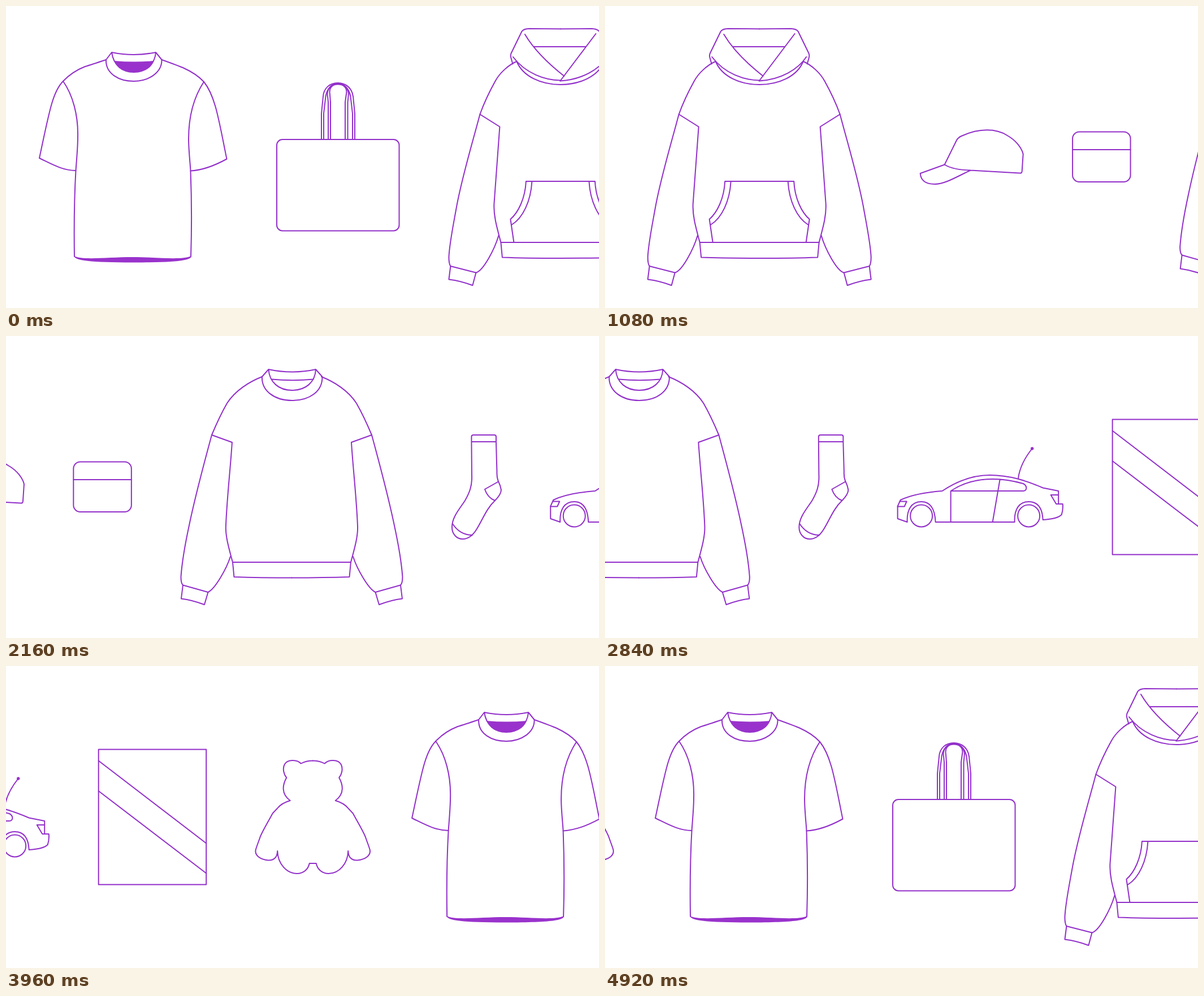
Animation of 1049x534 px, one loop 4960 ms. Source, as an HTML page:

```html
<!DOCTYPE html>
<html lang="en">
<head>
<meta charset="utf-8">
<title>Merchandise strip</title>
<style>
  html, body { margin: 0; width: 100%; height: 100%; overflow: hidden; background: #fff; }
  svg { display: block; width: 1049px; height: 534px; }
  #track { fill: none; stroke: #922fca; stroke-width: 2; stroke-linejoin: round; stroke-linecap: round; }
  .solid { fill: #9932cc; stroke: none; }
</style>
</head>
<body>
<svg viewBox="0 0 1049 534">
  <g id="track">
    <g id="shirt">
      <path d="M177 95C165 99 150 104 140 107Q117 116 101 133C82 152 76 190 59 269C80 279 100 291 123.5 291"/>
      <path d="M101 133C118 157 128 193 127 232C127 250 125 270 123.5 291C121 335 120 380 121 443"/>
      <path d="M275.5 95C295 102 306 106 315 110Q337 120 350 134C371 160 377 205 390.5 270.5Q355 290 326.5 291.5"/>
      <path d="M350 134C333 160 323 195 323 235C323 255 326 280 326.5 291.5C328 330 329 380 327 443"/>
      <path d="M187 82L177 95C176 120 200 133 226 133C252 133 276 118 275.5 95L265 82Q226 90 187 82C190 104 205 117 226 117C247 117 263 104 265 82"/>
      <path class="solid" d="M191.5 97Q226 100 262 97C256 111 244 117 226 117C208 117 197 111 191.5 97Z"/>
      <path class="solid" d="M120.5 442C135 450 180 444 224 444C268 444 310 450 328 442C328 449 310 453.500 224 453.500C150 453.500 121 450 120.500 442Z"/>
    </g>

    <g id="bag">
      <rect x="479" y="236" width="216.500" height="161.500" rx="10"/>
      <path d="M558 236V190L561 160C562 145 573 136 587 136C601 136 612 145 614 160L617 190V236"/>
      <path d="M562 236V190L565.500 160C568 146 576 137 587 137C598 137 607 146 609.500 160L613 190V236"/>
      <path d="M570 236V170L568.500 155C569 145 578 137 587 137C597 137 605 145 606 155L604.500 170V236"/>
      <path d="M574 236V170L572.500 152C573 143 579 138.500 587 138.500C596 138.500 602 143 602.500 152L600 170V236"/>
    </g>

    <g id="hoodie" transform="translate(419.4)">
      <g id="hoodieHalf">
        <path d="M561.5 40.5L506 40Q496 40.500 493 45L474 84Q472.500 88 474 92L477 102.500"/>
        <path d="M561.5 139C528 139 495 125 484 98C470 104 454 118 446 133C436 151 426 172 419 191.500L454 213.500C451 260 447 305 444 350C443 370 448 388 456 418"/>
        <path d="M419 191.5C404 248 388 300 378 353C371 392 365 420 364 444Q364 456 367 460L412 471.500C425 468 445 430 452 406"/>
        <path d="M367 460L364 483.500Q385 486 406 494L412 471.500"/>
        <path d="M561.5 418H456L458.500 444.500Q500 446 561.500 446"/>
        <path d="M561.5 310H500.500C499 340 487 365 473 377L479 418M511 310C509 345 495 375 475 387"/>
      </g>
      <use href="#hoodieHalf" transform="matrix(-1 0 0 1 1123 0)"/>
      <path d="M477.5 90C500 120 535 131 561 131.500M561 132.500C600 130 630 112 644.500 90"/>
      <path d="M498.5 50C515 78 540 102 568 124M624 49L561 132.500M514 72H606"/>
    </g>

    <g transform="translate(419.4)">
      <path d="M889 280.5L910 238Q913 232 920 229.500C950 216 980 216 1000 229C1016 238 1026 252 1028 262L1026 292Q1026 296 1022 295.500L935 290.500Q905 290 889 280.500L846 296C847 309 857 315 872 315C890 315 912 301 935 290.500"/>
    </g>

    <g transform="translate(1022.3)">
      <rect x="512.500" y="222.500" width="102.500" height="88.500" rx="12"/>
      <path d="M512.5 254H615"/>
    </g>

    <g transform="translate(1415.4)">
      <g id="sweaterHalf">
        <path d="M453 72C430 81 405 97 391 119C379 140 372 156 364 175L400 188C397 235 391 285 389 335C388 352 393 371 401 400"/>
        <path d="M364 175C349 230 335 282 324 335C316 372 311 405 309.500 426Q309.500 437 313 440.500L357.500 453C370 447 390 412 397 390"/>
        <path d="M313 440.5L310 464.500Q330 467 351 475L357.500 453"/>
        <path d="M505.5 400H401L403.500 426Q450 427.500 505.500 427.500"/>
      </g>
      <use href="#sweaterHalf" transform="matrix(-1 0 0 1 1011 0)"/>
      <path d="M464.5 59L453 72C452 97 475 114 506 114C537 114 560 98 559.500 72L548 59Q506 68 464.500 59C466 82 483 96 506 96C530 96 547 82 548 59M470 76.500Q506 80 544 76.500"/>
    </g>

    <g transform="translate(1415.4)">
      <path d="M823.5 187V178Q823.500 175 827 175H864Q867 175 867 178V187L868.500 240Q868 250 871 257Q875 265 876 272C876 277 873 283 865 291C850 305 843 325 833 341C827 351 819 359 808 359C797 359 789 350 789 338C789 320 803 305 812 291C820 277 825 265 824 245L823.500 187H867"/>
      <path d="M871 257.500L847 271Q852 286 865 291M790 332Q803 352 825 352"/>
    </g>

    <g transform="translate(2306.7)">
      <path d="M72 323V301L77 290C98 280 125 276 151 274C175 258 205 246 235 246C270 246 300 256 329 268.500L356.500 274V297H364Q365 307 362 316C357 321 345 324 329 325C328 305 320 293 304 293C287 293 278 306 279 329H139C138 307 131 293 114 293C97 293 88 306 89 329Z"/>
      <path d="M76 292.500H88L84 301.500H72M356.500 281H343L352.500 297H357"/>
      <path d="M166 329V274C187 260 212 253 240 253C262 253 280 257 294 261C301 264 302 274 294 274H166M253 253.500L240 329"/>
      <circle cx="114" cy="318" r="19.500"/>
      <circle cx="304" cy="318" r="19.500"/>
      <path d="M285.5 251C288 232 298 214 310 199"/>
      <circle class="solid" cx="310" cy="199" r="2.700"/>
    </g>

    <g transform="translate(2306.7)">
      <rect x="452" y="147.500" width="190.500" height="239"/>
      <path d="M452 167.500L642.500 313.500M452 221L642.500 366.500"/>
    </g>

    <g transform="translate(2306.7)">
      <path id="bearHalf" d="M831 167.500Q819 167.500 810 172.500C803 165 786 165 781 174C777 182 780 192 784.500 197.500C778 209 774 226 791 238Q776 242 768 252L760 260.500C750 279 743 290 738 302C735 311 732 318 730 325C728 335 738 342 752 343.500C763 344 768 338 768.500 327C769 350 785 367 803 367C815 367 823 359 825 349H831"/>
      <use href="#bearHalf" transform="matrix(-1 0 0 1 1662 0)"/>
    </g>

    <!-- the strip starts over -->
    <g transform="translate(3254.1)">
      <use href="#shirt"/>
      <use href="#bag"/>
      <use href="#hoodie"/>
    </g>
  </g>
</svg>
<script>
  const LOOP = 4960, STEP = 40, SPEED = 0.6553; // ms, ms, px per ms
  const track = document.getElementById('track');
  const start = performance.now();

  function draw() {
    const t = (performance.now() - start) % LOOP;
    const x = Math.floor(t / STEP) * STEP * SPEED;
    track.setAttribute('transform', `translate(${-x} 0)`);
    requestAnimationFrame(draw);
  }
  draw();
</script>
</body>
</html>
```
